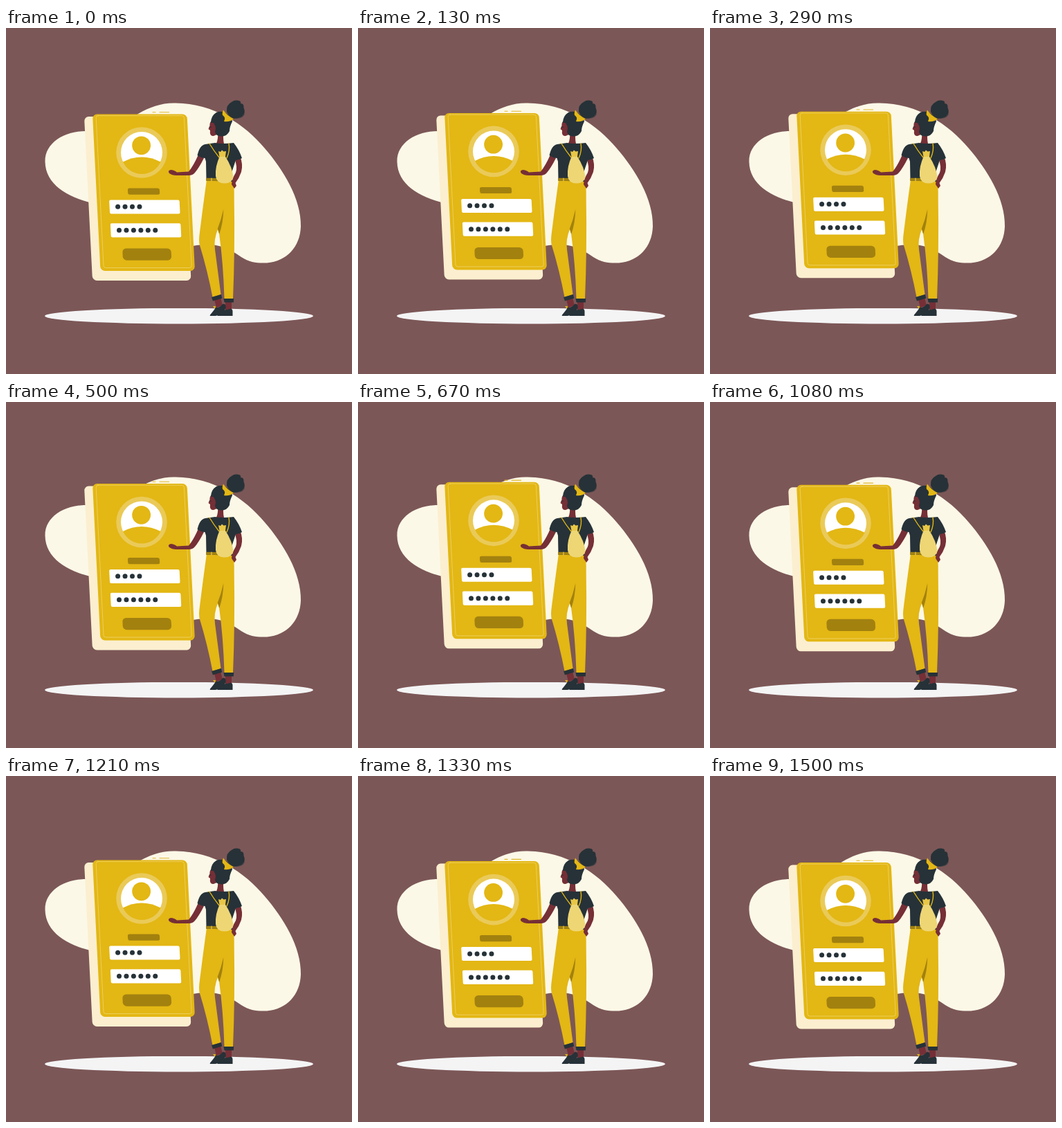
An HTML page that plays this animation: 500x500 px, repeating every 1.54 s.

```html
<!DOCTYPE html>
<html lang="en">
<head>
<meta charset="utf-8">
<title>Login card</title>
<style>
  html, body { margin: 0; width: 100%; height: 100%; overflow: hidden; background: #7c5757; }
  svg { display: block; width: 100%; height: 100%; }
  .gold { fill: #e3b714; }
  .deep { fill: #a2810f; }
  .dark { fill: #263238; }
  .skin { fill: #762f36; }
  .white { fill: #fff; }
  .line { fill: none; stroke-linecap: round; }
</style>
</head>
<body>
<svg viewBox="0 0 500 500">
  <path fill="#fcf8e7" d="M118 149C86 148 56 165 56.500 193C57 226 88 244 125 253C180 268 220 318 270 315C302 309 321 317 340 331C352 339 364 340 377 339.500C406 337 425 316 426 287C427 247 400 204 374 174C345 139 300 109 245 108.500C225 108 208 114 191 124C168 138 150 150 118 149Z"/>
  <ellipse cx="250" cy="416.200" rx="194" ry="11.300" fill="#f4f4f5"/>

  <g id="card">
    <g transform="skewX(2.9)">
      <rect x="106.500" y="128" width="142.500" height="237" rx="6.500" fill="#fbefd0"/>
      <rect class="gold" x="118.700" y="124.500" width="136.500" height="226.500" rx="6.500"/>
      <rect class="line" x="123.600" y="126.700" width="127.200" height="219.800" rx="3" stroke="#f3dd8c" stroke-width=".6"/>
      <rect class="deep" x="164.100" y="231.500" width="46" height="9.200" rx="2.500"/>
      <rect class="white" x="136.500" y="248.500" width="101.500" height="20" rx="2"/>
      <rect class="white" x="136.500" y="282.200" width="101.500" height="20.200" rx="2"/>
      <rect class="deep" x="152" y="318.500" width="70.300" height="17.200" rx="5.500"/>
    </g>
    <circle cx="196" cy="180" r="36.800" fill="#eaca58"/>
    <circle class="white" cx="196" cy="180" r="30"/>
    <circle class="gold" cx="195.600" cy="169.800" r="13.400"/>
    <path class="gold" d="M169 193.500Q182 186.500 196 186.500T223.500 193.500A30 30 0 0 1 169 193.500Z"/>
    <path class="line" d="M212 121.800H216M222 121.800H235.500" stroke="#dfb72c" stroke-width="1.100"/>
    <g id="dots" class="dark"></g>
  </g>

  <!-- legs and shoes -->
  <path class="skin" d="M301 392L310 389L313 401L304 404ZM317 395H326V408H317Z"/>
  <path class="gold" d="M299 402L303 402L302 406Z"/>
  <path class="dark" d="M295 414.500Q298 411 301 407Q303 403 305 404Q309 404 313 399Q317 398 317.500 402Q319 407 313 409Q308 415 303 416H296Q294 416 295 414.500ZM305 415Q311 412 313 407Q318 408 323 406Q327 405 327.500 409V416H306Z"/>
  <path class="gold" d="M290 219L328 221Q330 227 329.700 245Q331 320 328 392L315.500 391Q314 340 308 297L306 291Q300 306 302 320L310.500 385L298.500 389Q291 350 280 314Q278 308 280 295Q285 255 290 219Z"/>
  <path class="deep" d="M314.300 262Q311 277 305.800 290L308.200 298Q314 281 314.300 262Z"/>
  <path class="dark" d="M297 389L311 385L312.200 390.500L299 394.500ZM314.500 391H329.200L328.800 396.500H315.500Z"/>

  <!-- arms -->
  <path class="skin" d="M278 183L286 188Q279 202 273 209Q270 213 264 213L246 213Q240 213 236 210Q233 206 238 205Q243 205 247 208.500L264 207.500Q271 199 278 183Z"/>
  <path class="skin" d="M330 188L338 185Q343 197 340 208Q337 217 331.500 224L333 228L330 232L326 226Q326 219 332 209Q335 201 330 188Z"/>

  <!-- torso -->
  <path class="skin" d="M306 150H315Q313 158 315 167H304Q307 160 306 150Z"/>
  <path class="dark" d="M302 166Q313 168 329 166Q337 176 341 188Q337 191 332 191L327 206V222L289.500 220.500L289 193L287.500 188Q282 188 276.500 184Q280 169 288 168Z"/>
  <path class="deep" d="M289.500 216.800L307 217V221L289 220.800Z"/>
  <path class="line" d="M297 217V221" stroke="#eaca58" stroke-width="1.200"/>
  <path class="line" d="M294 167Q300 177 308 187M322 167Q324 177 319 188" stroke="#e3b714" stroke-width="1.400"/>
  <path fill="#eed675" d="M309 185Q302 200 303 214Q304 224 315 224.500Q327 225 328.500 215Q327 201 316.500 185Z"/>
  <path fill="#e9c746" d="M307 178L310 179L312 176.500L314.500 178.500L318 178L317 186H308.500Z"/>

  <!-- head -->
  <path class="skin" d="M298 133Q294 136 294.500 141L292.500 146L295 148Q294 157 300 156L307 153L308 133Z"/>
  <path class="dark" d="M296 137Q296 127 304 122Q311 119 318 123Q326 128 327 135Q323 143 323 149Q319 157 311 156.500Q303 156 302 150Q304 144 301.500 140Q300 136 296 137Z"/>
  <path class="gold" d="M314 118.500Q312 123 313 126Q318 129 315 135Q324 136 329 131.500Q320 127 314 118.500Z"/>
  <path class="dark" d="M319 121Q318 111 326 107Q331 103 338 105.500Q340 107 339 109Q344 109 343.500 115Q347 123 341 128Q335 131 329 131Q322 128 319 121Z"/>
  <path class="line" d="M344 122Q346 130 332 130.500" stroke="#263238" stroke-width=".7"/>
  <path class="line" d="M294 143.500L297 143" stroke="#263238" stroke-width=".8"/>
</svg>
<script>
  const LOOP = 1540, STEP = 1000 / 24;
  const LOW = 720, TRAVEL = 10, REST = 9.35;
  const card = document.getElementById('card');

  const row = (count, x, y) => Array.from({ length: count }, (_, i) =>
    `<circle cx="${x + i * 10.45}" cy="${y}" r="3.5"/>`).join('');
  document.getElementById('dots').innerHTML = row(4, 161.6, 258.3) + row(6, 163.5, 292.3);

  // Linear float up and down, advancing at 24 steps per second.
  function draw() {
    const time = Math.floor((performance.now() % LOOP + 4) / STEP) * STEP;
    const away = Math.abs(time - LOW);
    const height = Math.min(away, LOOP - away) / (LOOP / 2) * TRAVEL;
    card.setAttribute('transform', `translate(0 ${height - REST})`);
    requestAnimationFrame(draw);
  }
  draw();
</script>
</body>
</html>
```
